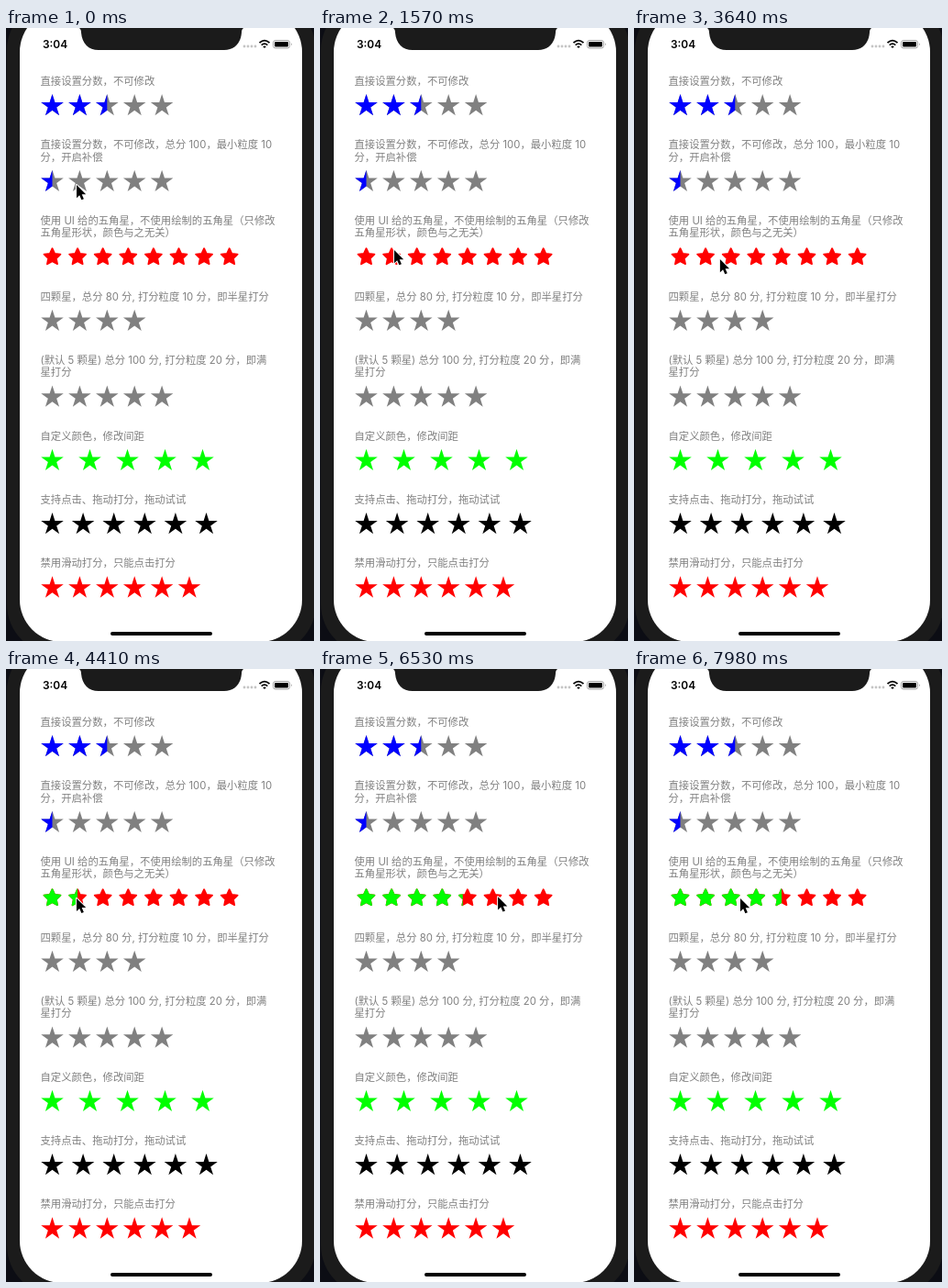
Write an HTML page that moves like this. It is 336x668 px and loops after 8 s.

```html
<!DOCTYPE html>
<html lang="zh-CN">
<head>
<meta charset="utf-8">
<style>
html, body { margin: 0; width: 100%; height: 100%; overflow: hidden; background: #0c0d14; }
svg { display: block; width: 336px; height: 668px; }
text { font: 11.35px Inter, "Noto Sans CJK SC", "Noto Sans CJK", sans-serif; fill: #808080; white-space: pre; }
.clock { font-size: 11.9px; font-weight: 600; fill: #000; }
.rounded { stroke-width: 1.8; stroke-linejoin: round; }
</style>
</head>
<body>
<svg viewBox="0 0 336 668">
  <rect x="1" y="-30" width="337" height="712" rx="54" fill="#1b1b1b"/>
  <rect x="15" y="-20" width="308" height="689" rx="46" fill="#fff"/>
  <path d="M76 -1C81 -1 82 2 82 5C83 17 90 24 101 24H238C249 24 256 17 257 5C257 2 258 -1 263 -1Z" fill="#1b1b1b"/>
  <rect x="114" y="658" width="111" height="4" rx="2"/>
  <text class="clock" x="40" y="22">3:04</text>
  <path d="M260 20h13" stroke="#c4c4c4" stroke-width="2.8" stroke-linecap="round" stroke-dasharray="0 4"/>
  <g fill="none" stroke="#000" stroke-width="1.8">
    <path d="M276.5 16.2Q282 11 287.5 16.2M278.7 18.7Q282 15.6 285.3 18.7"/>
    <path d="M280.2 20.2Q282 18.8 283.8 20.2L282 22Z" fill="#000" stroke="none"/>
  </g>
  <rect x="291.5" y="13.5" width="18" height="8.5" rx="2.5" fill="none" stroke="#999" stroke-width=".9"/>
  <rect x="293" y="15" width="15" height="5.5" rx="1.2"/>
  <path d="M311 16.2Q312.6 17.7 311 19.3Z" fill="#888"/>
  <g id="rows"></g>
  <path id="cursor" d="M0 0V14.2L3.2 11.2L5.4 16.2L7.9 15.2L5.7 10.2H10.2Z"
    stroke="#fff" stroke-width="2" stroke-linejoin="round" paint-order="stroke"/>
</svg>
<script>
const $ = id => document.getElementById(id);
const GRAY = '#808080', BLUE = '#00f', RED = '#f00', GREEN = '#0f0';
const LEFT = 50.5, PITCH = 29.9, UI_PITCH = 27.6, LINE = 13.4, LOOP = 8000;

function star(cx, cy, r, inner) {
  return 'M' + Array.from({ length: 10 }, (_, i) => {
    const a = i * Math.PI / 5, d = i % 2 ? r * inner : r;
    return (cx + d * Math.sin(a)).toFixed(2) + ' ' + (cy - d * Math.cos(a)).toFixed(2);
  }).join('L') + 'Z';
}

// x where a score ends, counted in stars
const edge = (score, pitch) => LEFT + (score - 0.5) * pitch;

const rows = [
  { text: ['直接设置分数，不可修改'], n: 5, score: 2.5 },
  { text: ['直接设置分数，不可修改，总分 100，最小粒度 10', '分，开启补偿'], n: 5, score: 0.5 },
  { text: ['使用 UI 给的五角星，不使用绘制的五角星（只修改', '五角星形状，颜色与之无关）'],
    n: 8, pitch: UI_PITCH, color: RED, score: 0, on: GREEN, rounded: true },
  { text: ['四颗星，总分 80 分, 打分粒度 10 分，即半星打分'], n: 4 },
  { text: ['(默认 5 颗星) 总分 100 分, 打分粒度 20 分，即满', '星打分'], n: 5 },
  { text: ['自定义颜色，修改间距'], n: 5, pitch: 41, color: GREEN },
  { text: ['支持点击、拖动打分，拖动试试'], n: 6, pitch: 33.6, color: '#000' },
  { text: ['禁用滑动打分，只能点击打分'], n: 6, color: RED }
];

let y = 62;
$('rows').innerHTML = rows.map(({ text, n, pitch = PITCH, color = GRAY, score, on = BLUE, rounded }, i) => {
  let out = text.map((s, k) => `<text x="37.5" y="${y + k * LINE}">${s}</text>`).join('');
  y += (text.length - 1) * LINE;
  const shape = rounded ? [y + 22.2, 9.4, 0.48] : [y + 22.9, 12.9, 0.382];
  const d = Array.from({ length: n }, (_, k) => star(LEFT + k * pitch, ...shape)).join('');
  const layer = (c, extra = '') =>
    `<path d="${d}" fill="${c}" ${rounded ? `class="rounded" stroke="${c}"` : ''} ${extra}/>`;
  out += layer(color);
  if (score !== undefined) {
    out += `<clipPath id="clip${i}"><rect id="fill${i}" width="${edge(score, pitch)}" height="668"/></clipPath>`
      + layer(on, `clip-path="url(#clip${i})"`);
  }
  y += 69.3;
  return out;
}).join('');

const clamp = u => Math.min(1, Math.max(0, u));
const ease = u => u * u * (3 - 2 * u);

// cursor strokes: start, end, target and, for curves, two control points
const strokes = [
  [560, 1540, [81, 242], [100, 230], [157, 248]],
  [1590, 2090, [241, 128]],
  [2240, 3000, [147, 50], [330, 125], [75, 136]],
  [3150, 3850, [74, 250], [130, 140], [107, 290]],
  [4300, 4850, [102, 249]],
  [5100, 5210, [116, 249]],
  [5590, 5680, [125, 249]],
  [6010, 6730, [210, 248]],
  [6740, 7620, [206, 251], [80, 252], [317, 252]],
  [7640, 7980, [116, 250]]
];

function cursorAt(t) {
  let pos = [77, 171];
  for (const [start, end, to, c1, c2] of strokes) {
    if (t < start) break;
    const u = ease(clamp((t - start) / (end - start))), v = 1 - u;
    pos = pos.map((p, k) => c1
      ? v * v * v * p + 3 * v * v * u * c1[k] + 3 * v * u * u * c2[k] + u * u * u * to[k]
      : v * p + u * to[k]);
  }
  return pos;
}

// clicks: start time and new score, each filled over 200 ms
const clicks = [[3960, 1.5], [4860, 2.5], [6350, 4.5]];

function fillAt(t) {
  return clicks.reduce((x, [start, score]) =>
    x + (edge(score, UI_PITCH) - x) * clamp((t - start) / 200), 39);
}

const begin = performance.now();
function draw(now) {
  const t = Math.max(0, now - begin) % LOOP;
  $('fill2').setAttribute('width', fillAt(t));
  $('cursor').setAttribute('transform', `translate(${cursorAt(t)})`);
  requestAnimationFrame(draw);
}
draw(begin);
</script>
</body>
</html>
```
